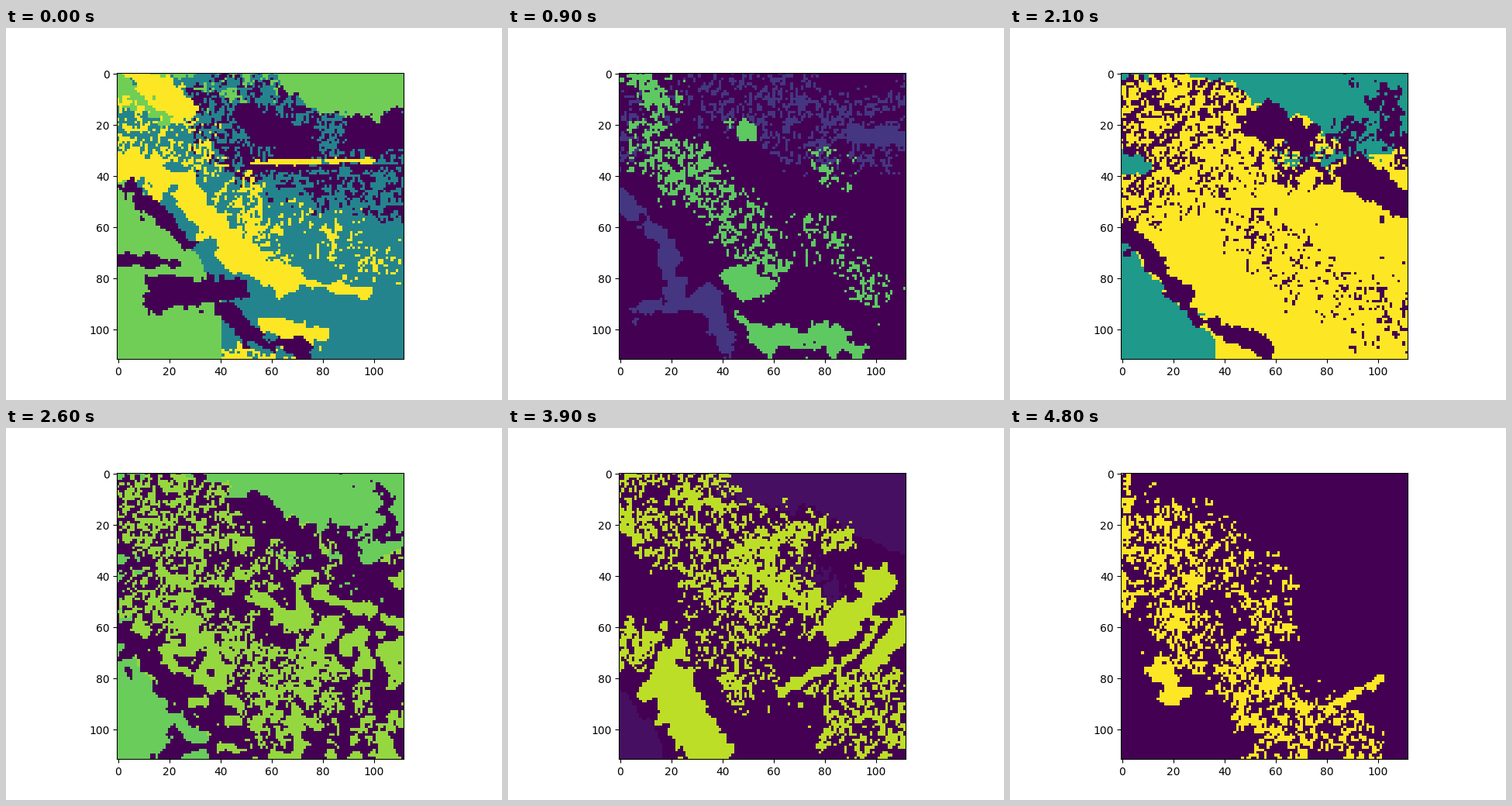
Animation of 640x480 px, one loop 4.9 s. Source, as a matplotlib script:

```python
import numpy as np
import matplotlib.pyplot as plt
from matplotlib.animation import FuncAnimation

N = 112
FRAMES = 49
BLANK = 14
BASE, CORNER, MID, GRAIN = range(4)

yy, xx = np.mgrid[0:N, 0:N].astype(float)


def smooth(a, passes):
    for _ in range(passes):
        p = np.pad(a, 1, mode="edge")
        a = (p[:-2, 1:-1] + p[2:, 1:-1] + p[1:-1, :-2] + p[1:-1, 2:] + 2 * a) / 6
    return a


def fractal(rng):
    """Noise of unit spread with fine and coarse detail."""
    octaves = [smooth(rng.normal(size=(N, N)), 4 ** k) for k in range(3)]
    total = sum(o / o.std() * s for o, s in zip(octaves, (.4, .8, .8)))
    return total / total.std()


def rank(a):
    """Spread values evenly over 0..1 while keeping their order."""
    return a.ravel().argsort().argsort().reshape(a.shape) / a.size


# Fields: distance in cells to the edge of a region, positive inside.

def above(*pts):
    return np.interp(xx, *zip(*pts)) - yy


def below(*pts):
    return -above(*pts)


def near(width, *pts):
    """Stroke of the given half width along a path."""
    dist = np.full((N, N), np.inf)
    for (x0, y0), (x1, y1) in zip(pts, pts[1:]):
        dx, dy = x1 - x0, y1 - y0
        t = np.clip(((xx - x0) * dx + (yy - y0) * dy) / (dx * dx + dy * dy), 0, 1)
        dist = np.minimum(dist, np.hypot(xx - x0 - t * dx, yy - y0 - t * dy))
    return width - dist


class Map:
    """A class map painted from ragged solid or speckled regions."""

    def __init__(self, seed, base=BASE):
        self.rng = np.random.default_rng(seed)
        self.cells = np.full((N, N), base)

    def solid(self, role, field):
        rough = min(1.7, .4 * field.max())
        self.cells[field + rough * fractal(self.rng) > 0] = role

    def speckle(self, role, density, field):
        rough = min(3, .4 * field.max())
        n = self.rng.normal(size=(N, N))
        n = n + .7 * np.roll(n, 1, 0) + .3 * np.roll(n, 1, 1) + .5 * fractal(self.rng)
        fade = np.clip((field + rough * fractal(self.rng)) / 4, 0, 1)
        self.cells[rank(n) < density * fade] = role


def valley():
    m = Map(1, MID)
    m.speckle(BASE, .45, near(24, (48, 20), (112, 36)))
    m.speckle(CORNER, .12, near(9, (34, 4), (56, 4)))
    m.solid(BASE, near(8, (96, 22), (112, 24)))
    m.solid(BASE, near(6, (52, 18), (70, 28)))
    m.solid(CORNER, above((62, 0), (74, 14), (112, 16)))
    m.solid(CORNER, near(5, (0, 5), (18, 17)))
    m.speckle(GRAIN, .32, near(12, (4, 22), (34, 31)))
    m.speckle(GRAIN, .4, near(11, (50, 50), (56, 68)))
    m.speckle(GRAIN, .2, near(10, (70, 55), (106, 76)))
    m.solid(BASE, near(1, (48, 37), (112, 36)))
    m.solid(GRAIN, near(.8, (52, 35), (100, 34)))
    m.solid(GRAIN, near(4, (9, 0), (25, 15)))
    m.solid(GRAIN, near(6, (0, 36), (26, 43), (47, 72), (66, 80)))
    m.solid(GRAIN, near(1.5, (74, 82), (97, 86)))
    m.solid(GRAIN, near(3, (57, 98), (80, 104)))
    m.speckle(GRAIN, .8, near(5, (44, 110), (72, 112)))
    m.solid(CORNER, below((0, 40), (26, 64), (40, 88), (41, 125)))
    m.solid(BASE, near(3, (4, 44), (27, 66)))
    m.solid(BASE, near(2, (0, 73), (24, 74)))
    m.solid(BASE, near(5, (14, 88), (46, 84)))
    m.solid(BASE, near(3, (42, 92), (52, 102), (72, 108)))
    return m.cells


def ridge():
    m = Map(2)
    m.speckle(CORNER, .35, near(18, (52, 8), (74, 22), (112, 24)))
    m.speckle(CORNER, .25, near(14, (4, 20), (30, 8)))
    m.solid(CORNER, near(3, (92, 24), (112, 25)))
    m.solid(CORNER, near(3.5, (0, 48), (18, 66), (22, 88)))
    m.solid(CORNER, near(3.5, (10, 92), (38, 88), (41, 112)))
    m.speckle(GRAIN, .85, near(7, (8, 0), (16, 12)))
    m.speckle(GRAIN, .5, near(12, (10, 24), (34, 46), (56, 72)))
    m.speckle(GRAIN, .35, near(8, (76, 62), (100, 86)))
    m.speckle(GRAIN, .4, near(6, (78, 32), (86, 40)))
    m.solid(GRAIN, near(3, (47, 21), (52, 21)))
    m.solid(GRAIN, near(4, (44, 79), (56, 83)))
    m.solid(GRAIN, near(4, (47, 96), (58, 104), (80, 102), (92, 109)))
    return m.cells


def plain():
    m = Map(3, GRAIN)
    m.speckle(BASE, .52, near(25, (0, 20), (26, 0)))
    m.speckle(BASE, .3, near(16, (4, 46), (50, 32)))
    m.speckle(BASE, .22, near(12, (48, 60), (70, 80)))
    m.speckle(BASE, .15, near(20, (96, 90), (112, 90)))
    m.solid(CORNER, above((38, 0), (50, 11), (72, 16), (94, 36), (112, 26)))
    m.speckle(BASE, .75, near(9, (68, 38), (90, 28)))
    m.speckle(CORNER, .5, near(5, (66, 32), (96, 34)))
    m.speckle(BASE, .8, near(7, (100, 8), (112, 32)))
    m.solid(BASE, near(7, (54, 19), (68, 23)))
    m.solid(BASE, near(6, (92, 40), (108, 50)))
    m.solid(CORNER, near(3, (2, 36), (6, 36)))
    m.solid(CORNER, below((0, 62), (18, 88), (36, 102), (38, 125)))
    m.solid(BASE, near(4, (2, 60), (13, 74), (27, 94), (54, 106)))
    return m.cells


def shore():
    m = Map(4)
    m.solid(CORNER, above((32, -8), (36, 9), (58, 10), (70, 19), (97, 24), (112, 19)))
    m.solid(CORNER, near(4, (96, 32), (112, 28)))
    m.speckle(CORNER, .25, near(6, (88, 40), (102, 46)))
    m.speckle(CORNER, .6, near(3, (0, 40), (2, 60)))
    m.solid(CORNER, near(12, (0, 86), (9, 98), (0, 110)))
    m.speckle(GRAIN, .5, near(11, (5, 0), (8, 24)))
    m.speckle(GRAIN, .35, near(12, (16, 30), (28, 24)))
    m.speckle(GRAIN, .22, near(12, (42, 24), (58, 46)))
    m.speckle(GRAIN, .8, near(3, (22, 4), (20, 18)))
    m.speckle(GRAIN, .5, near(11, (16, 52), (38, 64)))
    m.speckle(GRAIN, .5, near(12, (50, 72), (62, 98)))
    m.speckle(GRAIN, .35, near(12, (70, 82), (80, 94)))
    m.speckle(GRAIN, .5, near(4, (66, 58), (88, 58)))
    m.speckle(GRAIN, .5, near(4, (97, 86), (99, 112)))
    return m.cells


def slopes():
    m = Map(5)
    m.solid(CORNER, above((28, 0), (50, 12), (74, 15), (96, 26), (112, 30)))
    m.solid(CORNER, below((0, 82), (16, 106), (18, 125)))
    m.speckle(CORNER, .8, near(7, (74, 38), (80, 44)))
    m.speckle(GRAIN, .42, near(23, (0, 4), (30, 18), (56, 38)))
    m.speckle(GRAIN, .7, near(9, (46, 34), (76, 54)))
    m.speckle(GRAIN, .7, near(7, (66, 22), (88, 25)))
    m.speckle(GRAIN, .32, near(16, (34, 56), (50, 74)))
    m.speckle(GRAIN, .45, near(22, (96, 92), (108, 100)))
    m.speckle(GRAIN, .85, near(9, (0, 64), (8, 66)))
    m.solid(GRAIN, near(6, (101, 44), (86, 61)))
    m.solid(GRAIN, near(8, (112, 60), (98, 68)))
    m.solid(GRAIN, near(2, (64, 85), (92, 70)))
    for x in (76, 97, 105):
        m.solid(BASE, near(1.3, (x, 58), (x - 12, 73)))
    m.solid(GRAIN, near(10, (20, 84), (32, 106)))
    m.solid(GRAIN, near(4, (10, 86), (21, 70)))
    return m.cells


def streaks():
    m = Map(6)
    m.speckle(GRAIN, .8, near(5, (0, 0), (0, 50)))
    m.speckle(GRAIN, .45, near(10, (4, 28), (12, 34)))
    m.speckle(GRAIN, .45, near(12, (22, 18), (20, 54)))
    m.speckle(GRAIN, .28, near(14, (38, 28), (50, 46)))
    m.speckle(GRAIN, .5, near(13, (22, 64), (38, 68)))
    m.speckle(GRAIN, .35, near(9, (54, 54), (60, 66)))
    m.speckle(GRAIN, .5, near(13, (50, 80), (62, 104)))
    m.speckle(GRAIN, .4, near(12, (76, 94), (92, 106)))
    m.solid(GRAIN, near(4, (16, 76), (21, 86)))
    m.solid(GRAIN, near(1.5, (78, 92), (102, 80)))
    return m.cells


scenes = [f() for f in (valley, ridge, plain, shore, slopes, streaks)]
times = [0, 9, 21, 31, 39, 48]
# colour map position of the corner and grain classes in each scene
corner = [.785, .16, .54, 1, .04, .04]
grain = [1, .75, 1, .68, .9, 1]

spread = rank(smooth(np.random.default_rng(9).random((N, N)), 8))


def class_map(i):
    """Patches of the next scene gradually take over the current one."""
    k = min(np.searchsorted(times, i, side="right") - 1, len(scenes) - 2)
    t = (i - times[k]) / (times[k + 1] - times[k])
    return np.where(spread < t, scenes[k + 1], scenes[k])


def picture(i):
    if i == BLANK:
        return np.zeros((N, N))
    levels = np.array([0, np.interp(i, times, corner), .45, np.interp(i, times, grain)])
    return levels[class_map(i)]


fig, ax = plt.subplots(figsize=(6.4, 4.8), dpi=100)
image = ax.imshow(picture(0), cmap="viridis", vmin=0, vmax=1, interpolation="nearest")


def update(i):
    image.set_data(picture(i))
    return [image]


anim = FuncAnimation(fig, update, frames=FRAMES, interval=100, repeat=True, repeat_delay=0)
plt.show()
```
